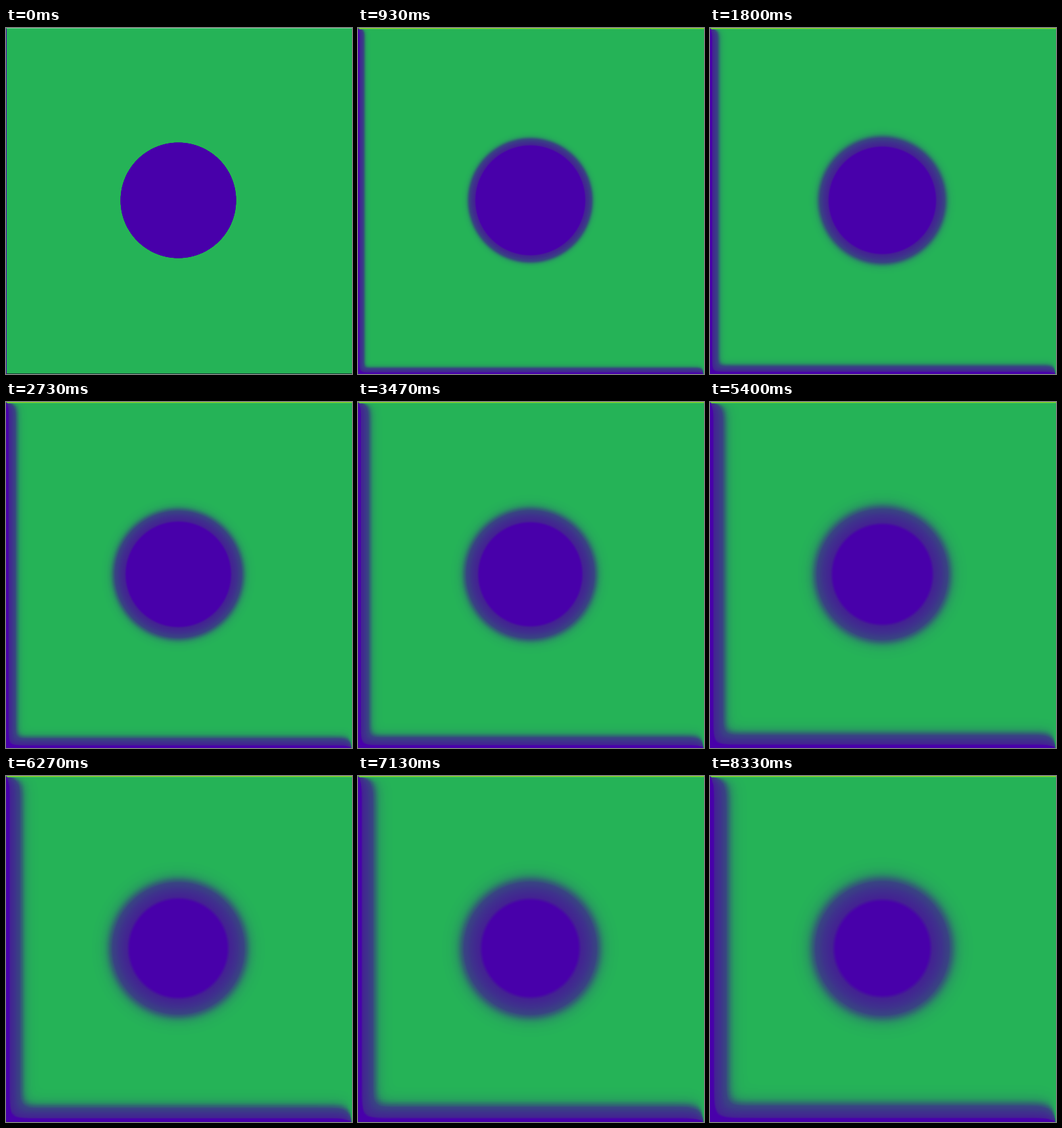
Write an HTML page with a canvas that moves like this. It is 512x512 px and loops after 8.39 s.

```html
<!DOCTYPE html>
<html lang="en">
<head>
<meta charset="utf-8">
<title>Diffusing disc</title>
<style>
  html, body { margin: 0; width: 100%; height: 100%; overflow: hidden; background: #25b257; }
  canvas { display: block; width: 100vw; height: 100vh; }
</style>
</head>
<body>
<canvas id="plate" width="512" height="512"></canvas>
<script>
const SIZE = 512, LAST = SIZE - 1;
const LOOP = 8390;
const CENTER = 254.5, RADIUS = 85.5;
const REACH = 3.2, CELLS = 128, STEP = REACH / CELLS;

const ctx = document.getElementById('plate').getContext('2d');
const image = ctx.createImageData(SIZE, SIZE);
const pixels = new Uint32Array(image.data.buffer);

const pack = (r, g, b) => (255 << 24 | b << 16 | g << 8 | r) >>> 0;

// Colour by heat: solid purple, a wide dusky band, then a quick turn to green
const stops = [
  [0, 72, 0, 170],
  [0.2, 72, 0, 170],
  [0.3, 67, 34, 146],
  [0.6, 62, 50, 140],
  [0.8, 56, 68, 130],
  [0.88, 47, 108, 112],
  [0.95, 39, 156, 95],
  [1, 37, 179, 87]
];
const palette = Uint32Array.from({ length: 256 }, (_, i) => {
  const u = i / 255;
  const n = Math.max(1, stops.findIndex(s => s[0] >= u));
  const a = stops[n - 1], b = stops[n];
  const f = (u - a[0]) / (b[0] - a[0]);
  return pack(...[1, 2, 3].map(c => Math.round(a[c] + (b[c] - a[c]) * f)));
});

function erf(x) {
  const a = Math.abs(x), t = 1 / (1 + 0.3275911 * a);
  const p = t * (0.254829592 + t * (-0.284496736 + t * (1.421413741 +
    t * (-1.453152027 + t * 1.061405429))));
  return Math.sign(x) * (1 - p * Math.exp(-a * a));
}

// Cold spread from an edge x = 0 whose end y = 0 is kept warm
function coldAt(x, y) {
  if (y === 0) return 0;
  if (x === 0) return 1;
  const n = 40, ds = (4 - x) / n;
  let sum = 0;
  for (let i = 0; i < n; i++) {
    const s = x + (i + 0.5) * ds;
    sum += Math.exp(-s * s) * erf(y * s / x);
  }
  return Math.min(1, sum * ds * 2 / Math.sqrt(Math.PI));
}

const row = CELLS + 1;
const warmth = new Float32Array(row * row);
for (let j = 0; j < row; j++) {
  for (let i = 0; i < row; i++) warmth[j * row + i] = 1 - coldAt(i * STEP, j * STEP);
}

function edgeHeat(dist, along, scale) {
  const i = Math.round(dist * scale);
  if (i >= CELLS) return 1;
  return warmth[Math.min(CELLS, Math.round(along * scale)) * row + i];
}

function discCold(x, y, spread) {
  const shift = spread * spread / (4 * RADIUS);
  const d = (Math.hypot(x - CENTER, y - CENTER) - RADIUS + shift) / spread;
  if (d > REACH) return 0;
  if (d < -REACH) return 1;
  return 0.5 - 0.5 * erf(d);
}

function draw(step) {
  const spread = Math.max(0.3, Math.sqrt(5 * step));
  const scale = 1 / (spread * STEP);
  for (let y = 0, p = 0; y < SIZE; y++) {
    for (let x = 0; x < SIZE; x++, p++) {
      const heat = edgeHeat(x, y, scale) * edgeHeat(LAST - y, LAST - x, scale)
        - discCold(x, y, spread);
      pixels[p] = palette[Math.round(255 * Math.max(0, heat))];
    }
  }
  // Hot top edge
  pixels.fill(step ? pack(146, 212, 24) : pack(104, 212, 145), 1, SIZE);
  if (step) pixels.fill(pack(72, 195, 92), SIZE + 2, 2 * SIZE);
  // Dark bottom edge
  if (!step) pixels.fill(pack(24, 62, 52), LAST * SIZE + 1, SIZE * SIZE);
  ctx.putImageData(image, 0, 0);
}

let shown = -1;
const start = performance.now();

function tick() {
  const time = Math.floor((performance.now() - start) % LOOP / 10) * 10;
  const step = Math.floor((time + 3.4) * 0.015);
  if (step !== shown) draw(shown = step);
  requestAnimationFrame(tick);
}
tick();
</script>
</body>
</html>
```
